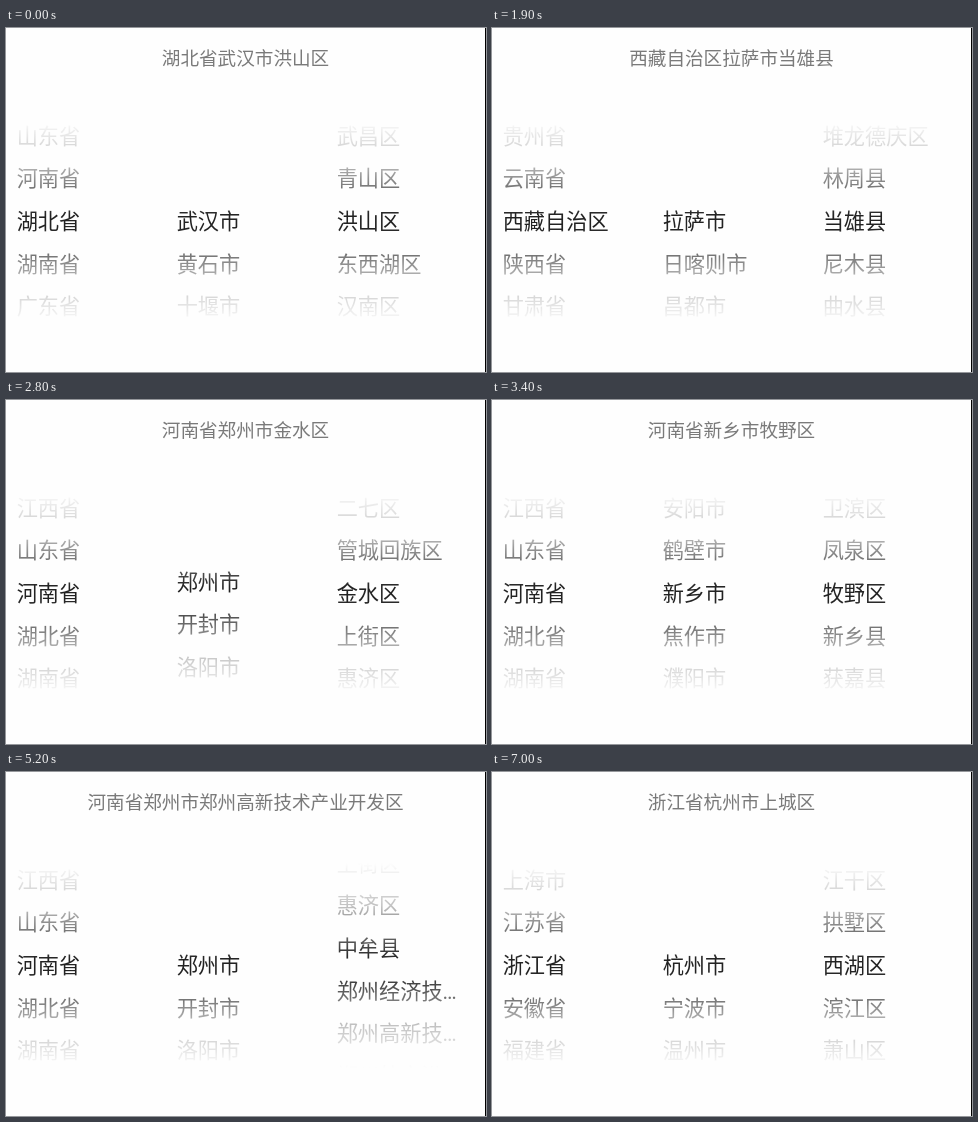
Recreate the animation shown at these times as an HTML page. Size 480 px wide and 344 px high, loop 7.1 s.

```html
<!DOCTYPE html>
<html lang="zh-CN">
<head>
<meta charset="utf-8">
<title>地区选择</title>
<style>
  html, body { margin: 0; width: 100%; height: 100%; overflow: hidden; background: #fefefe; }
  body {
    position: relative;
    font-family: Roboto, "Noto Sans CJK SC", "Noto Sans CJK", sans-serif;
  }
  #title {
    position: absolute; left: 0; top: 17px; width: 479px;
    font-size: 18.6px; line-height: 28px; text-align: center; white-space: nowrap;
    color: #7a7a7a;
  }
  .wheel {
    position: absolute; top: 86.67px; width: 160px; height: 213.33px; overflow: hidden;
    -webkit-mask-image: var(--fade); mask-image: var(--fade);
    --fade: linear-gradient(transparent 4px, rgba(0,0,0,.27) 47px, #000 100px,
      #000 113px, rgba(0,0,0,.27) 166px, transparent 209px);
  }
  .row {
    position: absolute; left: 10.67px; top: 86px; width: 138.67px; height: 42.67px;
    font-size: 21.2px; line-height: 42.67px; color: #222;
    white-space: nowrap; overflow: hidden; text-overflow: ellipsis;
  }
  #edge { position: absolute; left: 479px; top: 0; width: 1px; height: 344px; background: #000; }
</style>
</head>
<body>
<div id="title"></div>
<div id="edge"></div>
<script>
const LOOP = 7100, STEP = 100, ROW = 42.67, SETTLE = 150;

// province: its cities
const regions = `上海市:上海市
江苏省:南京市 无锡市 徐州市
浙江省:杭州市 宁波市 温州市
安徽省:合肥市 芜湖市 蚌埠市
福建省:福州市 厦门市 莆田市
江西省:南昌市 景德镇市 萍乡市
山东省:济南市 青岛市 淄博市
河南省:郑州市 开封市 洛阳市 平顶山市 安阳市 鹤壁市 新乡市 焦作市 濮阳市 许昌市
湖北省:武汉市 黄石市 十堰市
湖南省:长沙市 株洲市 湘潭市
广东省:广州市 韶关市 深圳市
广西壮族自治区:南宁市 柳州市 桂林市
海南省:海口市 三亚市 三沙市
重庆市:重庆市
四川省:成都市 自贡市 攀枝花市
贵州省:贵阳市 六盘水市 遵义市
云南省:昆明市 曲靖市 玉溪市
西藏自治区:拉萨市 日喀则市 昌都市
陕西省:西安市 铜川市 宝鸡市
甘肃省:兰州市 嘉峪关市 金昌市`;

// city: its districts
const areas = `杭州市:上城区 下城区 江干区 拱墅区 西湖区 滨江区 萧山区 余杭区
合肥市:瑶海区 庐阳区 蜀山区 包河区
福州市:鼓楼区 台江区 仓山区 马尾区
南昌市:东湖区 西湖区 青云谱区 湾里区
济南市:历下区 市中区 槐荫区 天桥区
郑州市:中原区 二七区 管城回族区 金水区 上街区 惠济区 中牟县 郑州经济技术开发区 郑州高新技术产业开发区 郑州航空港经济综合实验区 巩义市 荥阳市
开封市:龙亭区 顺河回族区 鼓楼区 禹王台区 祥符区 杞县 通许县
洛阳市:老城区 西工区 瀍河回族区 涧西区 吉利区 洛龙区 孟津县
平顶山市:新华区 卫东区 石龙区 湛河区 宝丰县 叶县 鲁山县
安阳市:文峰区 北关区 殷都区 龙安区 安阳县 汤阴县 滑县
鹤壁市:鹤山区 山城区 淇滨区 浚县 淇县 鹤壁经济技术开发区
新乡市:红旗区 卫滨区 凤泉区 牧野区 新乡县 获嘉县 原阳县
武汉市:江岸区 江汉区 硚口区 汉阳区 武昌区 青山区 洪山区 东西湖区 汉南区 蔡甸区
长沙市:芙蓉区 天心区 岳麓区 开福区 雨花区 望城区 长沙县 浏阳市 宁乡市
广州市:荔湾区 越秀区 海珠区 天河区 白云区 黄埔区 番禺区 花都区 南沙区 从化区
南宁市:兴宁区 青秀区 江南区 西乡塘区 良庆区 邕宁区 武鸣区
海口市:秀英区 龙华区 琼山区 美兰区
重庆市:万州区 涪陵区 渝中区 大渡口区 江北区 沙坪坝区 九龙坡区
成都市:锦江区 青羊区 金牛区 武侯区 成华区 龙泉驿区 青白江区
贵阳市:南明区 云岩区 花溪区 乌当区 白云区 观山湖区 开阳县
昆明市:五华区 盘龙区 官渡区 西山区 东川区 呈贡区 晋宁区
拉萨市:城关区 堆龙德庆区 林周县 当雄县 尼木县 曲水县 墨竹工卡县`;

const parse = text => Object.fromEntries(text.split("\n").map(line => {
  const [name, list] = line.split(":");
  return [name, list.split(" ")];
}));
const cities = parse(regions), districts = parse(areas), provinces = Object.keys(cities);

const smooth = u => u * u * (3 - 2 * u);
const flick = u => u * u;

// each wheel: its first row, then swipes as start, end, row reached, easing
const move = (start, end, to, ease = smooth) => ({ start, end, to, ease });
const provinceWheel = {
  first: 8,
  moves: [move(1174, 1650, 17), move(1900, 2700, 7), move(5600, 6100, 2)]
};
const cityWheel = {
  first: 0,
  moves: [move(2712, 3400, 6), move(3810, 4200, 0, flick)]
};
const districtWheel = {
  first: 6,
  moves: [move(1300, 1350, 3), move(4300, 4700, 8), move(5100, 5448, 0), move(6600, 7000, 4)]
};

function position({ first, moves }, t) {
  let pos = first;
  for (const { start, end, to, ease } of moves) {
    const u = Math.min(1, Math.max(0, (t - start) / (end - start)));
    pos += (to - pos) * ease(u);
  }
  return pos;
}

// the heading takes a new district only once its wheel has settled
const settled = ({ first, moves }, t) =>
  moves.reduce((row, m) => t >= m.end + SETTLE ? m.to : row, first);

const title = document.getElementById("title");
const wheels = [0, 160, 320].map(x => {
  const wheel = document.createElement("div");
  wheel.className = "wheel";
  wheel.style.left = x + "px";
  const rows = Array.from({ length: 7 }, () => {
    const row = document.createElement("div");
    row.className = "row";
    return wheel.appendChild(row);
  });
  document.body.appendChild(wheel);
  return rows;
});

function turn(rows, list, pos) {
  const top = Math.round(pos) - 3;
  rows.forEach((row, i) => {
    row.textContent = list[top + i] || "";
    row.style.transform = `translateY(${(top + i - pos) * ROW}px)`;
  });
}

function draw(t) {
  const p = position(provinceWheel, t), c = position(cityWheel, t);
  const province = provinces[Math.round(p)];
  const city = cities[province][Math.round(c)];
  const list = districts[city];
  turn(wheels[0], provinces, p);
  turn(wheels[1], cities[province], c);
  turn(wheels[2], list, position(districtWheel, t));
  title.textContent = province + city + list[Math.min(settled(districtWheel, t), list.length - 1)];
}

let shown = -1;
const start = performance.now();
function tick() {
  const t = Math.floor((performance.now() - start) % LOOP / STEP) * STEP;
  if (t !== shown) draw(shown = t);
  requestAnimationFrame(tick);
}
tick();
</script>
</body>
</html>
```
